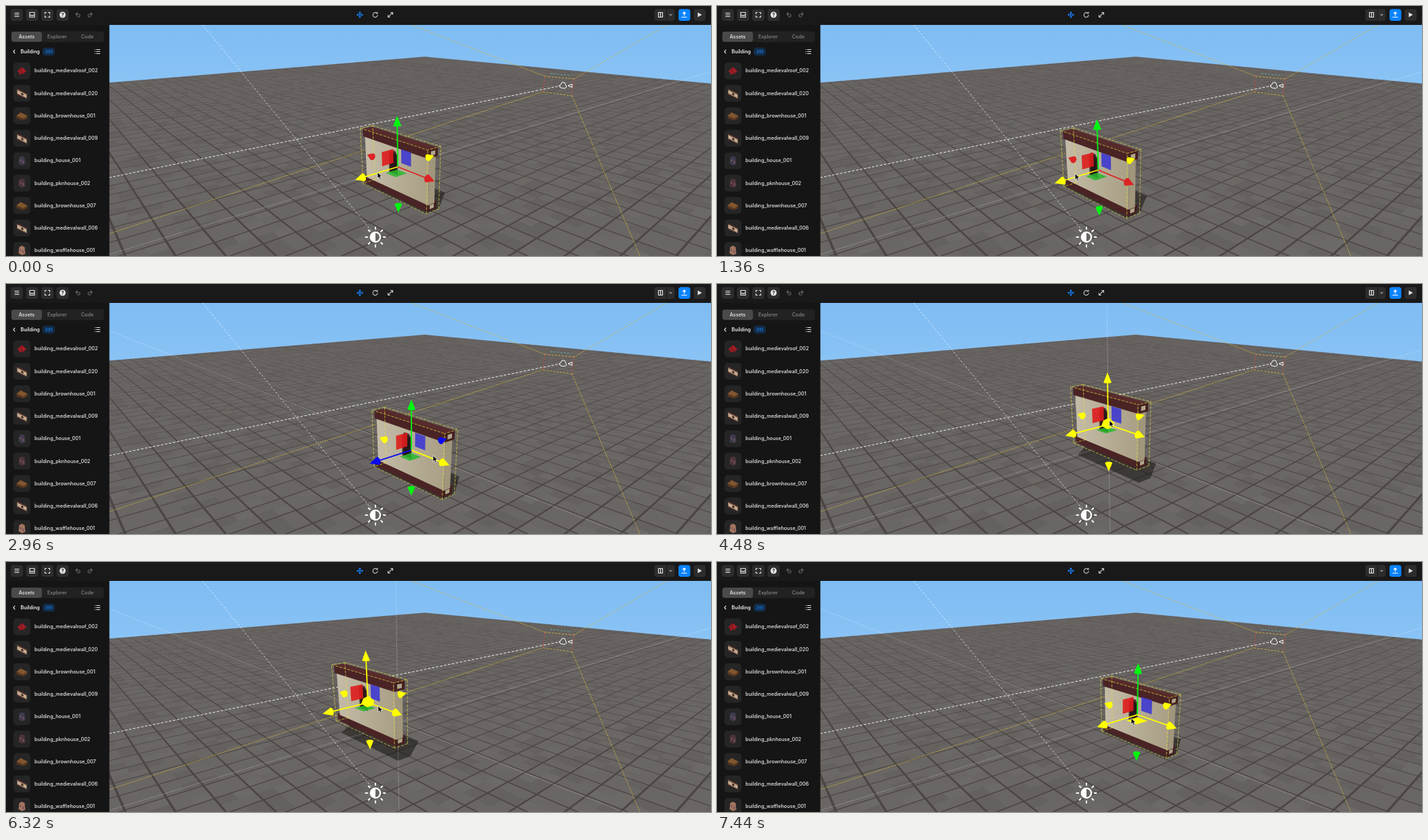
Recreate the animation shown at these times as an HTML page with a canvas. Size 1040x370 px, loop 7.52 s.

```html
<!DOCTYPE html>
<html lang="en">
<head>
<meta charset="utf-8">
<title>Scene editor</title>
<style>
html, body { margin: 0; width: 100%; height: 100%; overflow: hidden; background: #151515; }
canvas, svg { position: absolute; left: 0; top: 0; width: 1040px; height: 370px; display: block; }
text { font: 500 7.25px Inter, "Open Sans", sans-serif; fill: #eee; }
.ico { fill: none; stroke: #e4e4e4; stroke-width: 1.2; stroke-linecap: round; stroke-linejoin: round; }
.dim { stroke: #666; }
.solid { fill: #e4e4e4; stroke: none; }
</style>
</head>
<body>
<canvas id="view" width="1040" height="370"></canvas>
<svg viewBox="0 0 1040 370">
  <rect width="1040" height="28" fill="#191919"/>
  <rect y="28" width="152.5" height="342" fill="#151515"/>
  <g fill="#2d2d2d">
    <rect x="7" y="4.5" width="18" height="17.5" rx="4"/>
    <rect x="29.5" y="4.5" width="18" height="17.5" rx="4"/>
    <rect x="52" y="4.5" width="18" height="17.5" rx="4"/>
    <rect x="74.5" y="4.5" width="18" height="17.5" rx="4"/>
    <rect x="956.5" y="4.5" width="30" height="17.5" rx="4"/>
    <rect x="1014.5" y="4.5" width="17.5" height="17.5" rx="4"/>
  </g>
  <rect x="992" y="4.5" width="17.5" height="17.5" rx="4" fill="#0a84ff"/>
  <path d="M974.5 4.5v17.5" stroke="#191919"/>
  <g class="ico">
    <path d="M13 10.500h6M13 13h6M13 15.500h6"/>
    <path d="M35 9.500h7v7h-7zM35 13.500h2l1 1h1l1-1h2"/>
    <path d="M57.500 11.500v-2h2M62.500 9.500h2v2M64.500 14.500v2h-2M59.500 16.500h-2v-2"/>
    <path class="dim" d="M105 10l-2 2 2 2M103 12h4q2 0 2 2t-2 2h-2"/>
    <path class="dim" d="M125 10l2 2-2 2M127 12h-4q-2 0-2 2t2 2h2"/>
    <path d="M518 13h8M522 9v8M519 12l-1 1 1 1M525 12l1 1-1 1M521 10l1-1 1 1M521 16l1 1 1-1" stroke="#1683ff"/>
    <path d="M547 10.500a3.500 3.500 0 1 0 1.200 3M548 9v2h-2" stroke="#bbb"/>
    <path d="M564 16l6-6M567.500 9.500h3v3M566.500 16.500h-3v-3" stroke="#bbb"/>
    <path d="M962.500 9.500h6v7h-6zM965.500 9.500v7"/>
    <path d="M979 12.300l1.500 1.500 1.500-1.500" stroke="#aaa"/>
    <path d="M1000.500 14v-4.500M998.500 11l2-2 2 2M997 16.500h7" stroke="#fff"/>
    <path d="M13 65.200l-2 2.300 2 2.300"/>
    <path d="M133.500 64.500h5M133.500 67.500h5M133.500 70.500h5M131.300 64.500h.1M131.300 67.500h.1M131.300 70.500h.1"/>
  </g>
  <circle class="solid" cx="83.5" cy="13" r="4.5"/>
  <text x="83.5" y="15.6" text-anchor="middle" style="fill:#222;font-weight:700">?</text>
  <path class="solid" d="M1020.500 9.500l6 3.500-6 3.500z"/>
  <rect x="7.5" y="37.5" width="137" height="16" rx="4" fill="#222"/>
  <rect x="8" y="38" width="45" height="15" rx="3.5" fill="#4a4a4a"/>
  <g text-anchor="middle" style="font-weight:600">
    <text x="30.5" y="48">Assets</text>
    <text x="75.3" y="48" style="fill:#888">Explorer</text>
    <text x="120" y="48" style="fill:#888">Code</text>
  </g>
  <text x="21.5" y="70" style="font-weight:600">Building</text>
  <rect x="54" y="61.5" width="18" height="12" rx="4.5" fill="#122c49"/>
  <text x="63" y="69.8" text-anchor="middle" style="fill:#1b83f2;font-size:6.5px">391</text>
  <g id="list"></g>
</svg>
<script>
const W = 1040, H = 370, LOOP = 7520, STEP = 80;
const view = document.getElementById('view').getContext('2d');

// Asset list
const roof = '<path d="M-7 1L0-6 7 1 3 2 4 5-1 4-4 6-4 2z" fill="#a51d25"/><path d="M0-6L-2 1 4 5" stroke="#60151a" fill="none"/>';
const wall = '<path d="M-7-6L7 1V8L-7 1z" fill="#c4ad91"/><path d="M-7-7L7 0V2L-7-5zM-7 0L7 7V8L-7 2z" fill="#60382f"/><path d="M-1-1l3 1.500v3l-3-1.500z" fill="#33231f"/>';
const hut = '<path d="M-8 0L-2-5 8 0V4L2 7-8 4z" fill="#553621"/><path d="M-8 0L-2-5 8 0 2 4z" fill="#80562f"/>';
const tower = c => `<path d="M-4-5L0-7 4-5 5 5 0 7-5 4z" fill="${c}"/><path d="M-3-2h2v3h-2zM1 0h2v4H1z" fill="#75515e"/>`;
const items = [
  ['medievalroof_002', roof], ['medievalwall_020', wall], ['brownhouse_001', hut],
  ['medievalwall_009', wall], ['house_001', tower('#3d3a4c')], ['pknhouse_002', tower('#4c3438')],
  ['brownhouse_007', hut], ['medievalwall_006', wall], ['wafflehouse_001', tower('#a3765f')]
];
document.getElementById('list').innerHTML = items.map(([name, art], i) => {
  const y = 96 + 33.22 * i;
  return `<rect x="11" y="${y - 12.5}" width="25" height="25" rx="5" fill="#252525"/>
    <g transform="translate(23.5 ${y})">${art}</g><text x="42" y="${y + 2.4}">building_${name}</text>`;
}).join('');

// Camera: world axes in view space, origin at the rest position of the wall
const CX = 596, CY = 276, FOCAL = 577, GROUND = -46, EDGE = 1690, CELL = EDGE / 40;
function proj([x, y, z]) {
  const d = FOCAL - .678 * x - .4069 * y - .6115 * z, s = FOCAL / d;
  return [CX + (-18 + .67 * x - .743 * z) * s,
          CY + (-38 + .302 * x - .9135 * y + .2724 * z) * s, d];
}
const add = (a, b, k = 1) => a.map((v, i) => v + b[i] * k);

function poly(g, pts, fill) {
  g.beginPath();
  pts.forEach(p => g.lineTo(p[0], p[1]));
  g.closePath();
  g.fillStyle = fill;
  g.fill();
}
const face = (g, pts, fill) => poly(g, pts.map(proj), fill);

function line(g, a, b, color, width = 1, dash = []) {
  g.beginPath();
  g.moveTo(a[0], a[1]);
  g.lineTo(b[0], b[1]);
  g.strokeStyle = color;
  g.lineWidth = width;
  g.setLineDash(dash);
  g.stroke();
  g.setLineDash([]);
}

function hull(pts) {
  const s = [...pts].sort((a, b) => a[0] - b[0] || a[1] - b[1]);
  const half = list => {
    const h = [];
    for (const p of list) {
      while (h.length > 1) {
        const [a, b] = h.slice(-2);
        if ((b[0] - a[0]) * (p[1] - a[1]) - (b[1] - a[1]) * (p[0] - a[0]) > 0) break;
        h.pop();
      }
      h.push(p);
    }
    return h.slice(0, -1);
  };
  return half(s).concat(half(s.reverse()));
}

// Static scenery
function drawFloor(g) {
  const at = (x, z) => [x, GROUND, z];
  const farZ = x => Math.min(EDGE, (440 - .678 * x) / .6115);
  const farX = z => Math.min(EDGE, (440 - .6115 * z) / .678);
  poly(g, [proj(at(-EDGE, -EDGE)), proj(at(EDGE, -EDGE)), [3000, 2000], [-2000, 2000], proj(at(-EDGE, EDGE))], '#6a6664');
  let seed = 7;
  const rnd = () => (seed = seed * 16807 % 2147483647) / 2147483647;
  const tile = CELL / 2;
  for (let x = -EDGE; x < EDGE - 1; x += tile) for (let z = -EDGE; z < EDGE - 1; z += tile) {
    const r = rnd();
    if (r > .4 || proj(at(x + tile, z + tile))[2] < 150) continue;
    face(g, [at(x, z), at(x + tile, z), at(x + tile, z + tile), at(x, z + tile)],
      r < .25 ? 'rgba(45,40,38,.08)' : 'rgba(130,124,122,.1)');
  }
  for (let i = -40; i <= 40; i++) {
    const a = i * CELL, w = 1.2, z = farZ(a), x = farX(a), color = '#4b4644';
    if (z > -EDGE) face(g, [at(a - w, -EDGE), at(a + w, -EDGE), at(a + w, z), at(a - w, z)], color);
    if (x > -EDGE) face(g, [at(-EDGE, a - w), at(-EDGE, a + w), at(x, a + w), at(x, a - w)], color);
  }
}

function drawHelpers(g) {
  const gold = 'rgba(222,190,56,.8)', white = 'rgba(255,255,255,.75)';
  line(g, [290, 28], [540, 334], white, .9, [3, 2.5]);
  line(g, [152, 254], [818, 118], 'rgba(255,255,255,.9)', 1, [4, 2]);
  const q = [[795, 104], [838, 108], [835, 133], [792, 127]];
  const ends = [[598, 28], [975, 28], [935, 370], [152, 337]];
  q.forEach((p, i) => {
    line(g, p, ends[i], gold, .9, [2.5, 1.2]);
    line(g, p, q[(i + 1) % 4], i % 2 ? '#c0504a' : gold, 1, [3, 2]);
  });
  line(g, [803, 100], [834, 103], '#5fa8a0', 1, [3, 2]);
  g.strokeStyle = '#fff';
  g.lineWidth = 1;
  g.beginPath();
  g.arc(822, 116, 3.2, Math.PI, 0);
  g.lineTo(827, 120);
  g.lineTo(824, 122);
  g.lineTo(818, 121);
  g.lineTo(816, 118);
  g.closePath();
  g.moveTo(829, 118);
  g.lineTo(835, 115.5);
  g.lineTo(835, 120.5);
  g.closePath();
  g.stroke();
}

function drawSun(g) {
  const x = 545, y = 342;
  g.lineCap = 'round';
  for (let i = 0; i < 8; i++) {
    const a = i * Math.PI / 4, c = Math.cos(a), s = Math.sin(a);
    line(g, [x + c * 11.8, y + s * 11.8], [x + c * 14.5, y + s * 14.5], '#fff', 2);
  }
  g.lineCap = 'butt';
  g.fillStyle = '#fff';
  g.beginPath();
  g.arc(x, y, 8.3, 0, 7);
  g.fill();
  g.fillStyle = '#686463';
  g.beginPath();
  g.arc(x, y, 6, -Math.PI / 2, Math.PI / 2);
  g.fill();
}

const back = document.createElement('canvas');
back.width = W;
back.height = H;
{
  const g = back.getContext('2d'), sky = g.createLinearGradient(0, 28, 0, 116);
  sky.addColorStop(0, '#7ebcf3');
  sky.addColorStop(1, '#8ac3f5');
  g.fillStyle = sky;
  g.fillRect(0, 0, W, H);
  drawFloor(g);
  drawHelpers(g);
}

// Wall
const LX = 74, HY = 46, LZ = 12;
function box(g, o, lx, y0, y1, lz, [front, end, top]) {
  const p = (x, y, z) => add(o, [x, y, z]);
  face(g, [p(-lx, y1, lz), p(lx, y1, lz), p(lx, y1, -lz), p(-lx, y1, -lz)], top);
  face(g, [p(lx, y0, lz), p(lx, y1, lz), p(lx, y1, -lz), p(lx, y0, -lz)], end);
  face(g, [p(-lx, y0, lz), p(lx, y0, lz), p(lx, y1, lz), p(-lx, y1, lz)], front);
}

const corner = i => [i & 1 ? LX : -LX, i & 2 ? HY : -HY, i & 4 ? LZ : -LZ];
const corners = [0, 1, 2, 3, 4, 5, 6, 7].map(corner);

function drawShadow(g, o) {
  const pts = corners.map(c => {
    const [x, y, z] = add(o, c), h = y - GROUND;
    return proj([x - .36 * h, GROUND, z - .52 * h]);
  });
  poly(g, hull(pts), 'rgba(28,25,24,.58)');
}

function drawWall(g, o) {
  const p = (x, y, z) => add(o, [x, y, z]);
  const lx = LX - 2, beam = ['#4a2325', '#44201f', '#572b2b'];
  const cap = y => face(g, [p(lx, y - 3, 4), p(lx, y + 3, 4), p(lx, y + 3, -4), p(lx, y - 3, -4)], '#b0a58c');
  const [a, b] = [proj(p(-LX, 0, 6)), proj(p(LX, 0, 6))];
  const cream = g.createLinearGradient(a[0], 0, b[0], 0);
  cream.addColorStop(0, '#c4bca7');
  cream.addColorStop(1, '#a89e84');
  box(g, o, lx, -45, -33, 9, beam);
  cap(-39);
  box(g, o, lx - 1, -36, 36, 6, [cream, '#a0967c', '#b9b09a']);
  face(g, [p(-13, -10, 6), p(7, -10, 6), p(7, 20, 6), p(2, 26, 6), p(-8, 26, 6), p(-13, 20, 6)], '#4a302b');
  face(g, [p(-10, -8, 6), p(4, -8, 6), p(4, 19, 6), p(0, 23, 6), p(-6, 23, 6), p(-10, 19, 6)], '#241918');
  box(g, o, lx, 33, 45, 9, beam);
  cap(39);
  const pts = corners.map(c => proj(add(o, c)));
  for (let i = 0; i < 8; i++) for (const bit of [1, 2, 4]) {
    const j = i | bit;
    if (j === i || (i === 0 && bit === 1)) continue;
    line(g, pts[i], pts[j], 'rgba(226,218,60,.9)', .8, [4, 2]);
  }
}

// Move handles
const AXES = [[1, 0, 0], [0, 1, 0], [0, 0, 1]];
const HUES = ['#dc2424', '#00f810', '#0a0af0'], HOT = '#ffff00';

function drawCone(g, o, axis, sign, k, color) {
  const u = AXES[(axis + 1) % 3], v = AXES[(axis + 2) % 3], dir = AXES[axis];
  const base = add(o, dir, 62 * sign * k), pts = [proj(add(o, dir, 76 * sign * k))];
  for (let i = 0; i < 18; i++) {
    const a = i * Math.PI / 9;
    pts.push(proj(add(add(base, u, 5.6 * k * Math.cos(a)), v, 5.6 * k * Math.sin(a))));
  }
  poly(g, hull(pts), color);
}

function drawGizmo(g, o, hot) {
  const c = proj(o), k = c[2] / FOCAL;
  const hue = i => hot.includes('xyz'[i]) ? HOT : HUES[i];
  const plane = (n, color) => {
    const u = AXES[(n + 1) % 3], v = AXES[(n + 2) % 3];
    const at = (a, b) => add(add(o, u, a * k), v, b * k);
    face(g, [at(8, 8), at(29, 8), at(29, 29), at(8, 29)], color);
  };
  for (const i of [0, 2, 1]) drawCone(g, o, i, -1, k, hue(i));
  plane(0, 'rgba(222,28,28,.9)');
  plane(2, 'rgba(62,56,208,.9)');
  plane(1, hot.includes('p') ? HOT : 'rgba(40,185,45,.85)');
  for (const i of [1, 0, 2]) {
    line(g, c, proj(add(o, AXES[i], 63 * k)), hue(i), 1.8);
    drawCone(g, o, i, 1, k, hue(i));
  }
  if (hot.includes('c')) {
    const [x, y] = c;
    poly(g, [[x - 10, y + 2], [x - 7, y - 6], [x + 1, y - 10], [x + 9, y - 3], [x + 8, y + 4], [x - 1, y + 7]], HOT);
  }
}

function drawAxisLine(g, i) {
  const from = [-4000, -400, -4000][i], to = [500, 400, 500][i];
  line(g, proj(add([0, 0, 0], AXES[i], from)), proj(add([0, 0, 0], AXES[i], to)),
    'rgba(255,255,255,.45)', .9, [1.5, 1.5]);
}

function drawCursor(g, x, y) {
  const p = [[0, 0], [0, 9], [2.1, 7.2], [3.6, 10.5], [5.2, 9.8], [3.8, 6.6], [6.5, 6.4]].map(([a, b]) => [x + a, y + b]);
  poly(g, p, '#000');
  g.strokeStyle = '#fff';
  g.lineWidth = .7;
  g.stroke();
}

// Time, wall offset x y z, pointer offset from the handle centre
const KEYS = [
  [0, 0, 0, 0, -30, 8], [160, 0, 0, 0, -30, 8],
  [880, 0, 0, 30.5, -35, 4], [1120, 0, 0, 33, -35, 4],
  [1680, 0, 0, 0, -33, 7], [2080, 0, 0, 0, 23, 7], [2320, 0, 0, 0, 28, 8],
  [2960, 29.7, 0, 0, 32, 8], [3120, 32, 0, 0, 32, 8],
  [3680, 0, 0, 0, 30, 8], [3920, 0, 0, 0, 2, -6],
  [4480, -9.7, 27.4, -7.4, 2, -6], [5280, 8, 18, -28, 8, -1],
  [6320, -38.5, 27.4, 24.5, 15, 5], [6720, 0, 0, 0, 4, 2],
  [6880, 0, 0, 0, -9, 5], [7440, 1.9, 0, -56.7, -9, 5], [LOOP, 1.9, 0, -56.7, -9, 5]
];
// Highlighted handles: axes, c for centre, p for ground plane
const HOTS = [[0, 'z'], [1760, ''], [1920, 'x'], [3760, ''], [3840, 'xyzc'], [6760, ''], [6840, 'xzp']];

function pose(t) {
  const i = KEYS.findIndex(k => k[0] > t), a = KEYS[i - 1], b = KEYS[i];
  const u = (t - a[0]) / (b[0] - a[0]), e = u * u * (3 - 2 * u);
  return a.slice(1).map((v, n) => v + (b[n + 1] - v) * e);
}

function draw(t) {
  const g = view, [x, y, z, dx, dy] = pose(t), o = [x, y, z], c = proj(o);
  const hot = HOTS.filter(h => h[0] <= t).pop()[1];
  g.drawImage(back, 0, 0);
  drawShadow(g, o);
  for (let i = 0; i < 3; i++) if (hot.includes('xyz'[i])) drawAxisLine(g, i);
  drawWall(g, o);
  drawSun(g);
  drawGizmo(g, o, hot);
  drawCursor(g, c[0] + dx, c[1] + dy);
}

const start = performance.now();
function tick(now) {
  const t = Math.max(0, now - start) % LOOP;
  draw(Math.floor(t / STEP) * STEP);
  requestAnimationFrame(tick);
}
draw(0);
requestAnimationFrame(tick);
</script>
</body>
</html>
```
